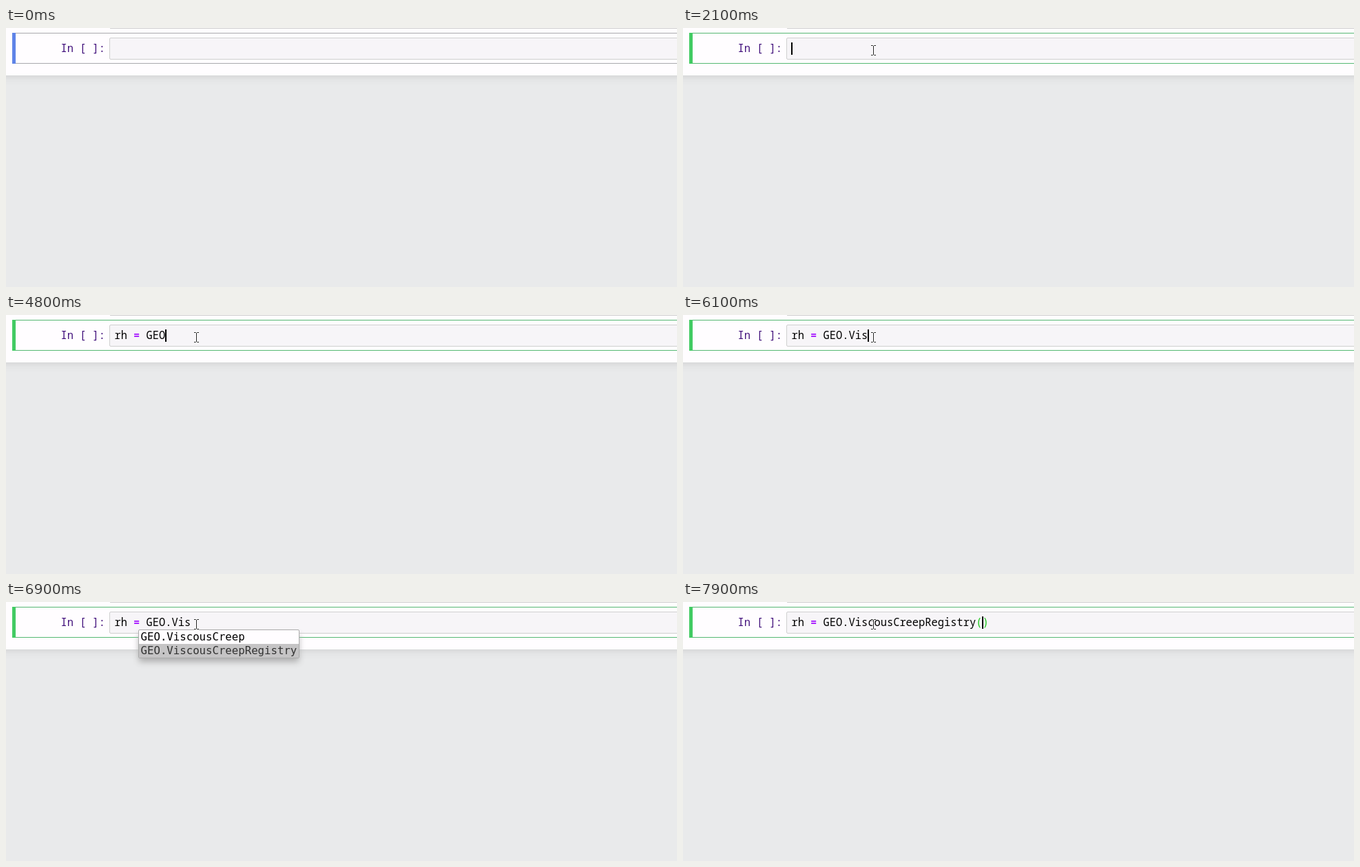
Recreate the animation shown at these times as an HTML page. Size 974x377 px, loop 8 s.

```html
<!DOCTYPE html>
<html lang="en">
<meta charset="utf-8">
<title>Notebook completion</title>
<style>
html, body { margin: 0; width: 100%; height: 100%; overflow: hidden; }
body { position: relative; background: #e9eaeb; }
div, svg { position: absolute; box-sizing: border-box; }
#page { left: -20px; right: -20px; top: -20px; height: 89px; background: #fffdff; box-shadow: 0 0 12px 1px rgba(87, 87, 87, .2); }
#above { left: 151px; right: 0; top: 0; height: 1px; background: #cfcfcf; }
#cell { left: 9px; right: -9px; top: 7px; height: 45px; border: 1px solid #a9a9ad; }
#cell::before { content: ""; position: absolute; left: -1px; top: -1px; width: 5px; height: 45px; background: #5f84e8; }
#cell.edit { border-color: #55b873; }
#cell.edit::before { background: #42cb63; }
#field { left: 150px; right: -9px; top: 14px; height: 32px; border: 1px solid #cfcfcf; border-radius: 2px; background: #f7f5f8; }
.code { top: 20px; font: 15.4px/20px "Noto Sans Mono", monospace; white-space: pre; color: #000; }
#prompt { left: 79.4px; color: #42107c; }
#text { left: 157.4px; }
#text b { color: #a2f; }
#text i { color: #1dc81d; font-style: normal; }
#caret { top: 21px; width: 2px; height: 18px; background: #000; }
#menu { left: 192px; top: 40px; width: 234px; height: 42px; border: 1px solid #ababab; border-radius: 2px; background: #fffdff;
  box-shadow: 0 6px 10px -1px #adadad; font: 15.7px/20px "DejaVu Sans Mono", monospace; white-space: pre; }
#menu div { left: 0; width: 100%; height: 20px; padding-left: 2.6px; }
#menu div + div { top: 20px; }
#menu .on { background: #c5c4c5; color: #333; }
</style>
<body>
<div id="page"></div>
<div id="above"></div>
<div id="cell"></div>
<div id="field"></div>
<div id="prompt" class="code">In [ ]:</div>
<div id="text" class="code"></div>
<div id="caret"></div>
<div id="menu"><div>GEO.ViscousCreep</div><div>GEO.ViscousCreepRegistry</div></div>
<svg id="beam" width="9" height="17" fill="none">
  <path d="M1 1.5h2.5l1 1 1-1H8M4.5 2v13M1 15.5h2.5l1-1 1 1H8" stroke="#fff" stroke-width="2.6"/>
  <path d="M1 1.5h2.5l1 1 1-1H8M4.5 2v13M1 15.5h2.5l1-1 1 1H8" stroke="#222"/>
</svg>
<svg id="arrow" width="13" height="20">
  <path d="M1 1v15l3.5-3.2 2.6 6 2.4-1-2.6-5.8h4.7z" fill="#000" stroke="#fff"/>
</svg>
<script>
const LOOP = 8000, CHAR = 9.24;
const $ = id => document.getElementById(id);
const full = "rh = GEO.ViscousCreepRegistry()";
const typed = [[0, 0], [3100, 1], [3300, 2], [4000, 4], [4100, 5], [4500, 6], [4600, 7], [4800, 8],
  [5200, 9], [5700, 10], [6000, 11], [6100, 12], [7500, 29], [7900, 31]];
const caretOff = [[0, 2000], [2600, 3100], [6600, 7200], [7700, 7900]];
// time, pointer kind, left, top
const pointer = [[700, "arrow", 386, 56], [800, "arrow", 380, 56], [1100, "beam", 285, 24],
  [1200, "beam", 279, 23], [1300, "beam", 274, 24], [1400, "beam", 272, 24]];

const latest = (list, t) => list.filter(e => e[0] <= t).pop();
const show = (id, on) => $(id).style.display = on ? "" : "none";

function draw(t) {
  const count = latest(typed, t)[1];
  $("cell").className = t >= 2000 ? "edit" : "";
  $("text").innerHTML = full.slice(0, count).replace("=", "<b>=</b>").replace("()", "<i>()</i>");
  $("caret").style.left = 157 + CHAR * Math.min(count, 30) + "px";
  show("caret", !caretOff.some(([from, to]) => t >= from && t < to));

  show("menu", t >= 6500 && t < 7500);
  [...$("menu").children].forEach((row, i) => row.className = i == (t >= 6900) ? "on" : "");

  const [, kind, x, y] = latest(pointer, t) || [];
  for (const id of ["arrow", "beam"]) {
    show(id, id == kind);
    $(id).style.left = x + "px";
    $(id).style.top = y + "px";
  }
}

const start = performance.now();
function tick() {
  draw((performance.now() - start) % LOOP);
  requestAnimationFrame(tick);
}
tick();
</script>
</body>
</html>
```
